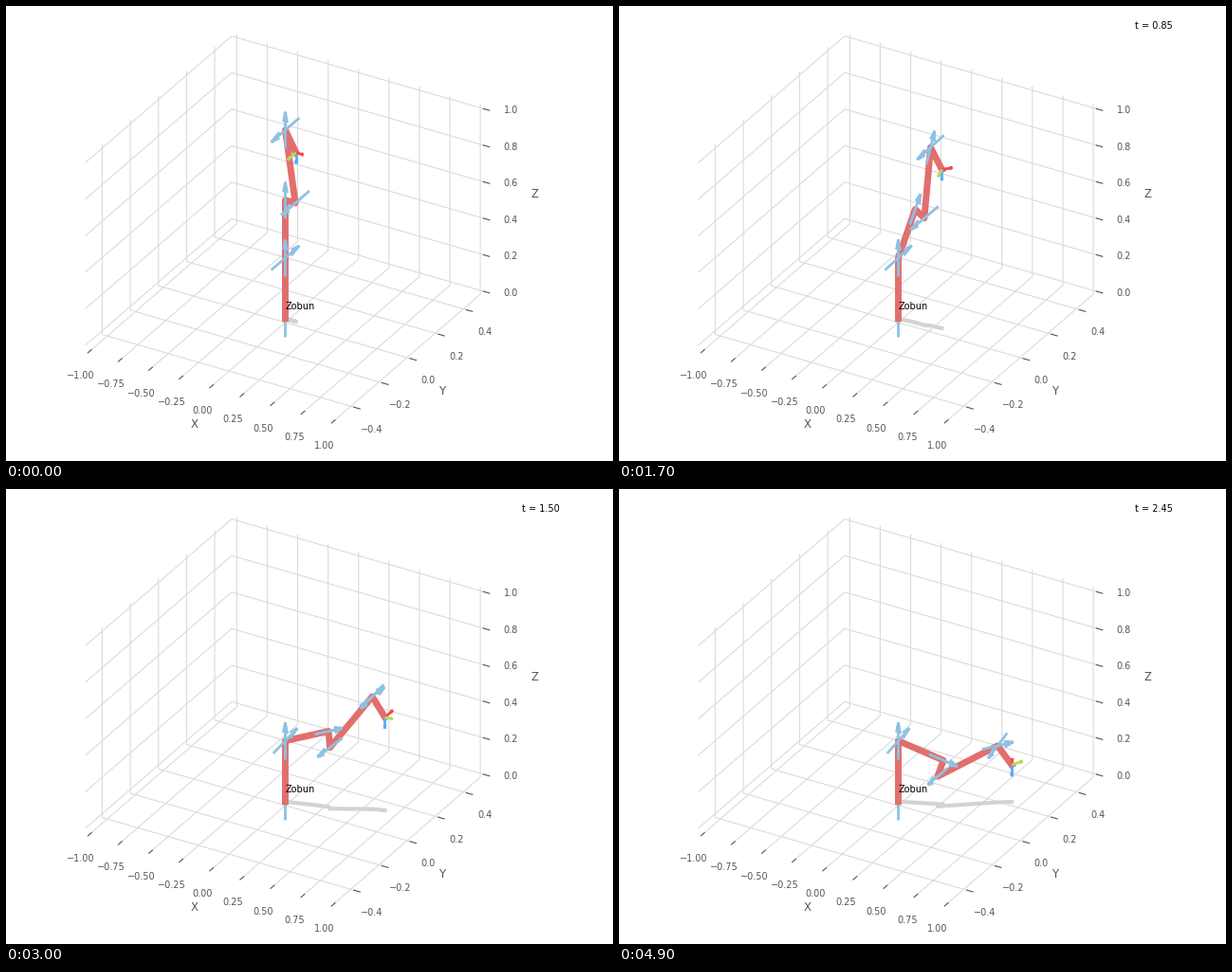
A matplotlib script for the animation above (5000 ms loop, 640 px wide and 480 px high).

```python
import math

import matplotlib.pyplot as plt
import numpy as np
from matplotlib.animation import FuncAnimation
from matplotlib.collections import LineCollection

FRAMES, INTERVAL, DT = 50, 100, 0.05
GREY = "#555555"
plt.rcParams.update({"font.family": "DejaVu Sans", "font.size": 7})

# Orthographic view: azimuth -60, elevation 30, box aspect 4:4:3
UNIT = 1.8294640721620434 * 4 / math.sqrt(41) / 1.85 * 480
LOW, HIGH = np.array([-1, -0.5, 0]), np.array([1, 0.5, 1])
SPAN = HIGH - LOW
CENTER = np.array([48 + 480 * 95 / 185, 480 * 90 / 185])
AZ, EL = math.radians(-60), math.radians(30)
SCALE = UNIT * np.array([1, 1, 0.75]) / SPAN
RIGHT = SCALE * [-math.sin(AZ), math.cos(AZ), 0]
DOWN = SCALE * [math.sin(EL) * math.cos(AZ), math.sin(EL) * math.sin(AZ), -math.cos(EL)]
NEAR = SCALE * [math.cos(EL) * math.cos(AZ), math.cos(EL) * math.sin(AZ), math.sin(EL)]

# Modified DH rows: a, d, alpha
H = math.pi / 2
DH = [(0, 0.333, 0), (0, 0, -H), (0, 0.316, H), (0.0825, 0, H),
      (-0.0825, 0.384, -H), (0, 0, H), (0.088, 0.107, H)]
Q_END = np.array([0.2134, 1.867, -0.2264, 0.4825, 0.2198, 1.396, -2.037])


def project(points):
    p = np.asarray(points, float) - (LOW + HIGH) / 2
    return np.stack([p @ RIGHT, p @ DOWN], axis=-1) + CENTER


def link_frame(a, d, alpha, theta):
    ct, st, ca, sa = math.cos(theta), math.sin(theta), math.cos(alpha), math.sin(alpha)
    return np.array([[ct, -st, 0, a],
                     [st * ca, ct * ca, -sa, -sa * d],
                     [st * sa, ct * sa, ca, ca * d],
                     [0, 0, 0, 1]])


def arm_frames(q):
    frames = [np.eye(4)]
    for row, angle in zip(DH, q):
        frames.append(frames[-1] @ link_frame(*row, angle))
    return frames


def arrow(start, end):
    """Shaft and two head strokes of a 3D arrow."""
    vec = end - start
    flat = math.hypot(vec[0], vec[1])
    axis = np.array([vec[1], -vec[0], 0]) / flat if flat > 1e-9 else np.array([0, 1, 0])
    back = 0.3 * math.cos(math.radians(15)) * vec
    side = 0.3 * math.sin(math.radians(15)) * np.cross(axis, vec)
    return np.array([[start, end], [end, end - back + side], [end, end - back - side]])


def smooth(s):
    return s ** 3 * (10 - 15 * s + 6 * s * s)


fig = plt.figure(figsize=(6.4, 4.8), dpi=100, facecolor="white")
ax = fig.add_axes([0, 0, 1, 1])
ax.set_xlim(0, 640)
ax.set_ylim(480, 0)
ax.axis("off")


def draw_axes():
    lo, hi = LOW - SPAN / 48, HIGH + SPAN / 48
    grid = []

    def add_axis(i, name, ticks, fmt, edge, tick_dir, out, corners):
        """out holds the outward sign of the edge along each direction."""
        out = np.array(out)

        def at(value, base):
            p = np.array(base, float)
            p[i] = value
            return p

        for value in ticks:
            grid.append(project([at(value, c) for c in corners]))
            p = at(value, edge)
            step = np.zeros(3)
            step[tick_dir] = out[tick_dir] * SPAN[tick_dir] / 12
            ax.plot(*project([p + 0.2 * step, p - 0.1 * step]).T, color=GREY, lw=0.8)
            x, y = project(p + out * SPAN * 11.5 / 172.8)
            ax.text(x, y, fmt.format(value).replace("-", "\u2212"),
                    color=GREY, ha="center", va="top")
        middle = at((LOW[i] + HIGH[i]) / 2, edge)
        x, y = project(middle + out * SPAN * 22 / 172.8)
        ax.text(x, y, name, color=GREY, size=8.4, ha="center", va="center")

    (x0, y0, z0), (x1, y1, z1) = lo, hi
    add_axis(0, "X", np.arange(-4, 5) / 4, "{:.2f}", (0, y0, z0), 1, (0, -1, -1),
             [(0, y1, z1), (0, y1, z0), (0, y0, z0)])
    add_axis(1, "Y", np.arange(-2, 3) / 5, "{:.1f}", (x1, 0, z0), 0, (1, 0, -1),
             [(x0, 0, z1), (x0, 0, z0), (x1, 0, z0)])
    add_axis(2, "Z", np.arange(6) / 5, "{:.1f}", (x1, y1, 0), 0, (1, 1, 0),
             [(x0, y0, 0), (x0, y1, 0), (x1, y1, 0)])
    ax.add_collection(LineCollection(grid, colors="#dbdbdb", linewidths=0.8, zorder=0.5))


draw_axes()
shadow, = ax.plot([], [], color="lightgrey", lw=3)
links, = ax.plot([], [], color="#E16F6D", lw=5)
colors = ["#8FC1E2"] * 7 + ["#F84752", "#BADA55", "#54AEFF"]
arrows = [ax.add_collection(LineCollection([], colors=c, linewidths=2)) for c in colors]
ax.text(*project([0, 0, 0.05]), "Zobun", color="black", zorder=3)
timer = fig.text(0.85, 0.95, "", color="black")


def update(k):
    frames = arm_frames(Q_END * smooth(k / (FRAMES - 1)))
    joints = np.array([f[:3, 3] for f in frames])
    links.set_data(*project(joints).T)
    shadow.set_data(*project(joints * [1, 1, 0]).T)

    shapes = [arrow(f[:3, 3] - 0.1 * f[:3, 2], f[:3, 3] + 0.1 * f[:3, 2])
              for f in frames[:-1]]
    tip = frames[-1]
    shapes += [arrow(tip[:3, 3], tip[:3, 3] + 0.06 * tip[:3, j]) for j in range(3)]

    # The farthest arrow lies behind the arm, the others in front of it
    order = np.argsort([(s @ NEAR).max() for s in shapes], kind="stable")
    for rank, j in enumerate(order):
        arrows[j].set_segments(project(shapes[j]))
        arrows[j].set_zorder(1.5 + rank)

    timer.set_text(f"t = {k * DT:.2f}" if k else "")
    return [links, shadow, timer, *arrows]


anim = FuncAnimation(fig, update, frames=FRAMES, interval=INTERVAL,
                     repeat=True, repeat_delay=0, blit=False)
plt.show()
```
